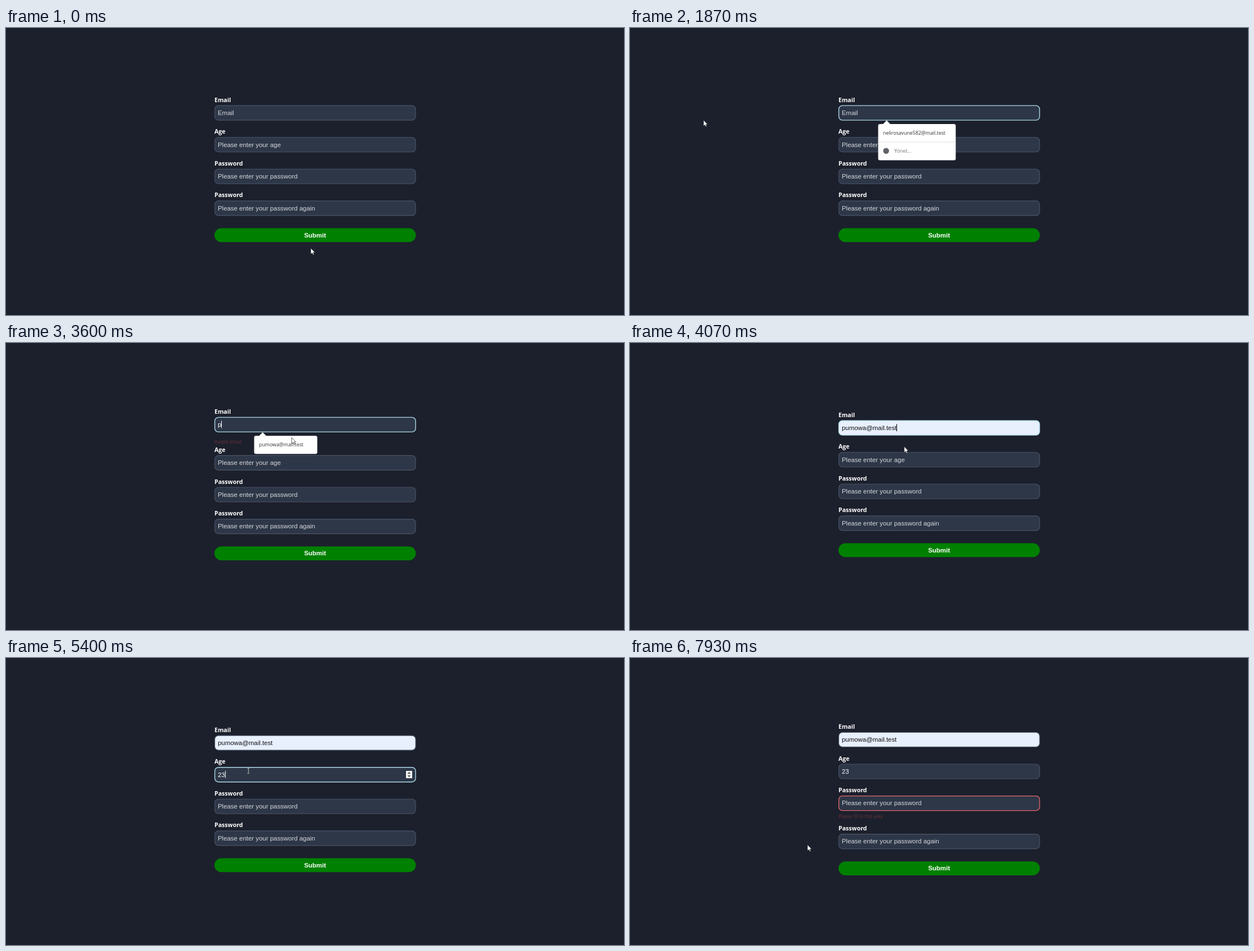
Animation, 1097 px wide and 511 px high, one loop 8 s. Source, as an HTML page:

```html
<!DOCTYPE html>
<html lang="en">
<head>
<meta charset="utf-8">
<title>Form validation</title>
<style>
  html, body { margin: 0; width: 100%; height: 100%; overflow: hidden; background: #1c202c; }
  svg { display: block; width: 1097px; height: 511px; }
  text { font-family: "Liberation Sans", Arial, sans-serif; font-size: 11.43px; white-space: pre; }
  .label { font: bold 10.6px "Open Sans", "Noto Sans", sans-serif; fill: #fff; }
  .box { fill: #2d3748; stroke: #4a5568; stroke-width: 1.1px; }
  .focus .box { stroke: #add8e6; stroke-width: 1.4px; }
  .bad .box { stroke: #e5666c; stroke-width: 1.3px; }
  .filled .box { fill: #e8f0fe; }
  .value { fill: #fff; }
  .hint .value { fill: #d6d8db; }
  .filled .value { fill: #111; }
  .caret { fill: #fff; }
  .filled .caret { fill: #000; }
  .error { font: 8.1px "Open Sans", "Noto Sans", sans-serif; fill: #6b3339; }
  .popup text { font: 8.8px "Open Sans", "Noto Sans", sans-serif; fill: #333; }
  .popup .manage { fill: #757575; }
  .submit { font-weight: bold; fill: #fff; text-anchor: middle; }
</style>
</head>
<body>
<svg id="stage" viewBox="0 0 1097 511"></svg>
<script>
const LOOP = 8000, STEP = 1000 / 15;
const TOP = 137.6, PITCH = 56.6, SHIFT = 5.7;
const MAIL = 'pumowa@mail.test', SAVED = 'nelirosavune582@mail.test';
const FIELDS = [
  ['Email', 'Email'],
  ['Age', 'Please enter your age'],
  ['Password', 'Please enter your password'],
  ['Password', 'Please enter your password again']
];

// Pointer hot spot: time, x, y
const PATH = [
  [0, 541, 392], [67, 492, 250], [133, 425, 67], [267, 425, 67],
  [467, 444, 106], [733, 461.5, 147], [1467, 461.5, 147], [1600, 393, 153],
  [1733, 306, 159], [1867, 130, 164], [2000, 8, 170], [2133, 30, 172],
  [2333, 213, 168], [2400, 269.5, 157], [2533, 345, 149], [2733, 388.5, 144],
  [3267, 388.5, 144], [3600, 507, 168.5], [3733, 504, 177], [3933, 498, 181],
  [4000, 498, 181], [4400, 430.3, 200.8], [5533, 430.3, 200.8],
  [5933, 412, 275.5], [6067, 412, 275.5], [6400, 317, 283], [6533, 319, 282],
  [6933, 394, 265], [7333, 394, 265], [7600, 310, 318], [7733, 293, 336],
  [7800, 293, 336], [7933, 315, 332.5]
];

const stage = document.getElementById('stage');

function add(parent, tag, attrs = {}, content = '') {
  const el = document.createElementNS('http://www.w3.org/2000/svg', tag);
  for (const key in attrs) el.setAttribute(key, attrs[key]);
  el.textContent = content;
  return parent.appendChild(el);
}
const show = (el, on) => { el.style.display = on ? '' : 'none'; };
const move = (el, x, y) => el.setAttribute('transform', `translate(${x} ${y})`);
const within = (t, a, b) => t >= a && t < b;

const fields = FIELDS.map(([name]) => {
  const g = add(stage, 'g');
  add(g, 'text', { class: 'label', x: 370, y: -6 }, name);
  add(g, 'rect', { class: 'box', x: 370.6, y: 0.5, width: 356.5, height: 26, rx: 6.5 });
  const value = add(g, 'text', { class: 'value', x: 376, y: 17.4 });
  const caret = add(g, 'rect', { class: 'caret', y: 6.6, width: 1, height: 13 });
  return { g, value, caret };
});

const spinner = add(fields[1].g, 'g');
add(spinner, 'rect', { x: 710, y: 6.8, width: 11, height: 13, fill: '#f1f1f1' });
add(spinner, 'path', { d: 'M712.8 11.8l2.7-2.9 2.7 2.9zM712.8 14.8l2.7 2.9 2.7-2.9z', fill: '#444' });

const error = add(stage, 'text', { class: 'error', x: 370 });

const button = add(stage, 'g');
add(button, 'rect', { x: 370, y: 356.6, width: 357.5, height: 24.6, rx: 12.3, fill: '#008000' });
add(button, 'text', { class: 'submit', x: 548.6, y: 372.8 }, 'Submit');

function makePopup(label, width, manage) {
  const g = add(stage, 'g', { class: 'popup' });
  add(g, 'rect', { x: 440.5, y: 33.3, width, height: manage ? 64.7 : 32.2, rx: 3, fill: '#fff' });
  add(g, 'path', { d: 'M448.8 33.8l6.8-6.8 6.8 6.8z', fill: '#fff' });
  const hover = add(g, 'rect', { x: 440.5, y: 38, width, height: 22.5, fill: '#e8e8e9' });
  show(hover, false);
  add(g, 'text', { x: 449, y: 52.6 }, label);
  if (manage) {
    add(g, 'rect', { x: 440.5, y: 65, width, height: 1, fill: '#dedede' });
    add(g, 'circle', { cx: 454.6, cy: 81.2, r: 5.2, fill: '#5f6368' });
    add(g, 'text', { class: 'manage', x: 469, y: 84.8 }, 'Yönet...');
  }
  return { g, hover };
}
const savedList = makePopup(SAVED, 137.7, true);
const mailList = makePopup(MAIL, 112, false);
const ageList = makePopup('23', 112, false);

const arrow = add(stage, 'path', {
  d: 'M0 0V10.8L2.5 8.5 4.1 12.1 5.9 11.3 4.3 7.8H7.6Z',
  fill: '#fff', stroke: '#15171d', 'stroke-width': 0.7
});
const beam = add(stage, 'path', {
  d: 'M-2-4.6H-.6L0-4 .6-4.6H2M0-4V4M-2 4.6H-.6L0 4 .6 4.6H2',
  fill: 'none', stroke: '#d8d5cd', 'stroke-width': 0.9
});

function pointer(t) {
  const i = PATH.findIndex(p => p[0] > t);
  if (i < 0) return PATH[PATH.length - 1].slice(1);
  const [t0, x0, y0] = PATH[i - 1], [t1, x1, y1] = PATH[i];
  const k = (t - t0) / (t1 - t0);
  return [x0 + (x1 - x0) * k, y0 + (y1 - y0) * k];
}

// Focused field, caret position and the time its blinking began
function focusAt(t) {
  if (within(t, 1060, 2000)) return [0, 376, 1060];
  if (within(t, 2995, 3260)) return [0, 376, 2995];
  if (within(t, 3260, 4060)) return [0, 382, 3260];
  if (within(t, 4060, 4795)) return [0, 473, 4060];
  if (within(t, 4795, 5195)) return [1, 376, 4795];
  if (within(t, 5195, 5325)) return [1, 382, 5195];
  if (within(t, 5325, 6460)) return [1, 389, 5325];
  if (within(t, 6995, 7595)) return [2, 376, 6995];
  return [-1, 0, 0];
}

function draw(time) {
  const t = Math.floor((time + 5) / STEP) * STEP;
  const [focus, caretX, since] = focusAt(t);
  const wrong = within(t, 1995, 4060) ? 0 : t >= 7595 ? 2 : -1;
  const preview = within(t, 3730, 4060);
  const mail = t >= 3730 ? MAIL : t >= 3260 ? MAIL[0] : '';
  const age = t >= 5325 ? '23' : t >= 5195 ? '2' : '';
  const values = [mail, age, '', ''];
  const tops = fields.map((_, i) =>
    TOP + PITCH * i + (wrong < 0 ? 0 : i <= wrong ? -SHIFT : SHIFT));

  fields.forEach(({ g, value, caret }, i) => {
    move(g, 0, tops[i]);
    g.classList.toggle('focus', focus === i);
    g.classList.toggle('bad', wrong === i && focus !== i);
    g.classList.toggle('filled', i === 0 && mail === MAIL);
    g.classList.toggle('hint', !values[i]);
    value.textContent = values[i] || FIELDS[i][1];
    caret.setAttribute('x', caretX);
    show(caret, focus === i && !preview && (t - since) % 1060 < 530);
  });

  show(error, wrong >= 0);
  error.setAttribute('y', wrong === 0 ? 178.8 : 284.8);
  error.textContent = wrong === 0 && mail ? 'Invalid email' : 'Please fill in this area';
  move(button, 0, wrong < 0 ? 0 : SHIFT);

  show(savedList.g, within(t, 1060, 1995) || within(t, 2995, 3260));
  show(mailList.g, within(t, 3260, 4060));
  show(mailList.hover, preview);
  show(ageList.g, within(t, 4795, 5195));
  move(savedList.g, 0, tops[0]);
  move(mailList.g, 0, tops[0]);
  move(ageList.g, 0, tops[1]);

  const [x, y] = pointer(t);
  const over = x > 370 && x < 727.5 ? tops.findIndex(top => within(y, top, top + 27)) : -1;
  show(spinner, focus === 1 || over === 1);
  show(beam, over >= 0);
  show(arrow, over < 0);
  move(over < 0 ? arrow : beam, x, y);
}

const start = performance.now();
function tick() {
  draw((performance.now() - start) % LOOP);
  requestAnimationFrame(tick);
}
tick();
</script>
</body>
</html>
```
